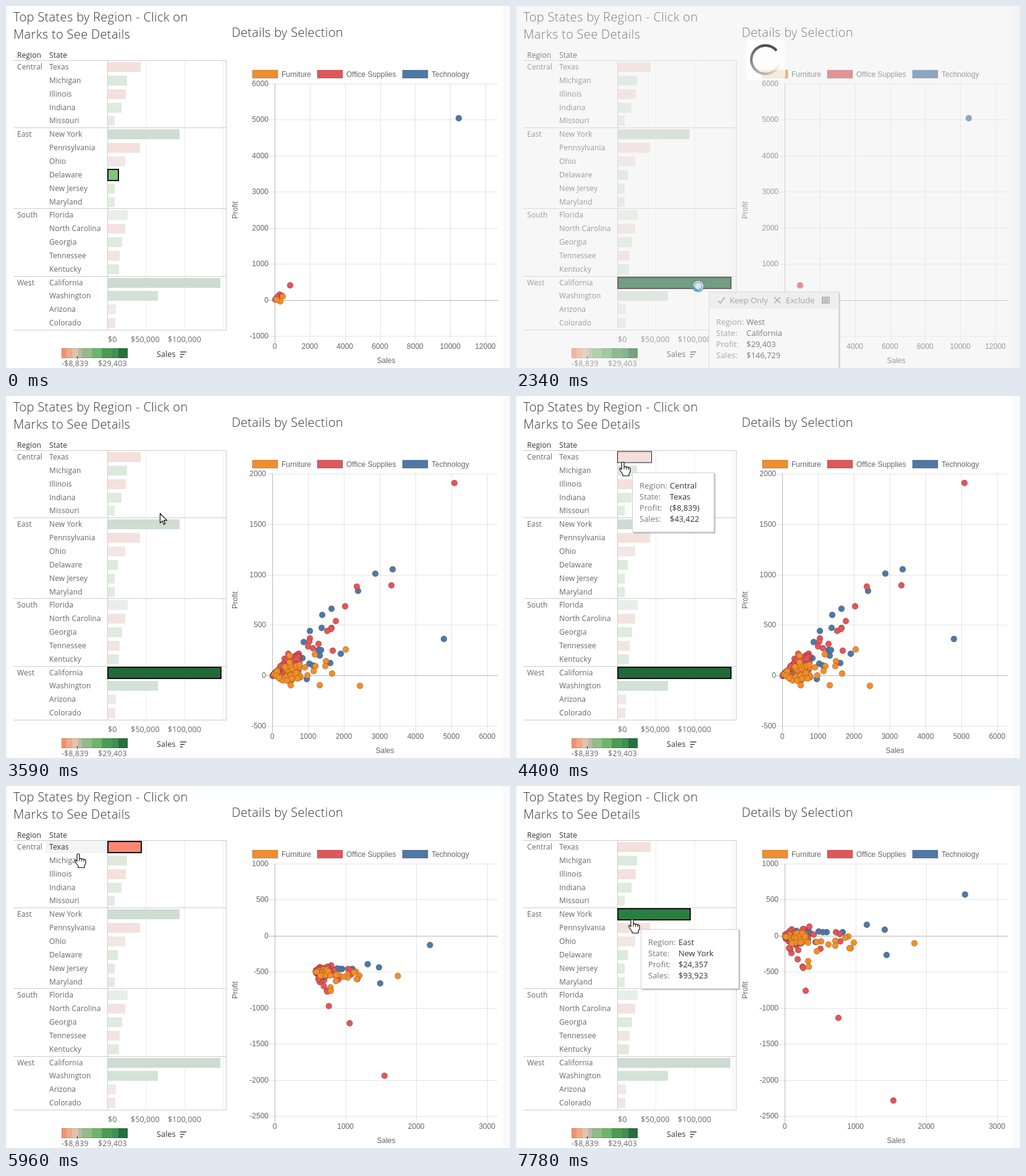
An HTML page for the animation above (8000 ms loop, 816 px wide and 587 px high).

```html
<!DOCTYPE html>
<html lang="en">
<head>
<meta charset="utf-8">
<title>Top States by Region</title>
<style>
html, body { margin: 0; width: 100%; height: 100%; overflow: hidden; background: #fafafa; }
svg { display: block; width: 816px; height: 587px; }
text { font: 12px "Open Sans", "Noto Sans", sans-serif; fill: #666; letter-spacing: .1px; white-space: pre; }
.title { font-size: 20px; font-weight: 300; fill: #333; letter-spacing: .35px; }
.head, .dark { fill: #333; }
.axis { font-size: 12.5px; }
.chart { font: 12px "Liberation Sans", Arial, sans-serif; letter-spacing: 0; }
.tip { font-size: 13px; letter-spacing: 0; fill: #777; }
.tip.dark { fill: #333; }
.line { stroke: #ccc; }
.faint { stroke: #eee; }
.grid { stroke: rgba(0,0,0,.1); }
.zero { stroke: rgba(0,0,0,.28); }
</style>
</head>
<body>
<svg id="stage" viewBox="0 0 816 587" xmlns="http://www.w3.org/2000/svg"></svg>
<script>
const stage = document.getElementById('stage');
const LOOP = 8000;

function add(parent, tag, attrs, content) {
  const el = document.createElementNS('http://www.w3.org/2000/svg', tag);
  set(el, attrs);
  if (content !== undefined) el.textContent = content;
  parent.appendChild(el);
  return el;
}
function set(el, attrs) {
  for (const k in attrs) el.setAttribute(k, attrs[k]);
}
const group = (parent = stage) => add(parent, 'g', {});
const rect = (p, x, y, width, height, fill, more) => add(p, 'rect', { x, y, width, height, fill, ...more });
const line = (p, x1, y1, x2, y2, cls) => add(p, 'line', { x1, y1, x2, y2, class: cls });
const text = (p, x, y, s, cls = '', anchor = 'start') => add(p, 'text', { x, y, class: cls, 'text-anchor': anchor }, s);
const show = (el, on) => el.setAttribute('display', on ? 'inline' : 'none');

function random(seed) {
  return () => {
    seed = (seed + 0x6D2B79F5) | 0;
    let v = Math.imul(seed ^ (seed >>> 15), 1 | seed);
    v = (v + Math.imul(v ^ (v >>> 7), 61 | v)) ^ v;
    return ((v ^ (v >>> 14)) >>> 0) / 4294967296;
  };
}

// ---- bar table ----
const ROW = 21.85, TOP = 88.5;
const states = [
  ['Texas', 53, '#f4dfda'], ['Michigan', 31, '#dde9dd'], ['Illinois', 29, '#f5e0de'],
  ['Indiana', 22, '#dfebdd'], ['Missouri', 11, '#e4ece2'],
  ['New York', 116, '#cedcd2'], ['Pennsylvania', 52, '#f4e1de'], ['Ohio', 28, '#f1e7e4'],
  ['Delaware', 16, '#dcebda'], ['New Jersey', 11, '#e0ecde'], ['Maryland', 11, '#e0ecde'],
  ['Florida', 32, '#eaeeea'], ['North Carolina', 28, '#f3e3e0'], ['Georgia', 23, '#deebdd'],
  ['Tennessee', 19, '#f2e4e1'], ['Kentucky', 18, '#deebdd'],
  ['California', 182, '#cddbd2'], ['Washington', 81, '#d3e2d7'], ['Arizona', 13, '#efe9e8'],
  ['Colorado', 12, '#f2e5e2']
];
const regions = { Central: 0, East: 5, South: 11, West: 16 };
const fullColor = { 0: '#fb8770', 5: '#297f41', 8: '#82c47b', 16: '#22693a' };
const rowMid = i => TOP + 10.5 + i * ROW;

rect(stage, 4, 0, 800, 587, '#fff');
const table = group();
text(table, 12, 25, 'Top States by Region - Click on', 'title');
text(table, 12, 53, 'Marks to See Details', 'title');
text(table, 18, 84, 'Region', 'head');
text(table, 70, 84, 'State', 'head');
const header = rect(table, 64, 89, 100, 20, '#f3f4f3');
for (const x of [226.5, 289.5, 351.5]) line(table, x, 89, x, 525, 'faint');
const labels = states.map(([name, w, color], i) => {
  rect(table, 165, Math.round(rowMid(i) - 8), w, 16, color);
  return text(table, 70, Math.round(rowMid(i) + 4), name);
});
for (const name in regions) {
  const i = regions[name], y = Math.floor(TOP + i * ROW) + .5;
  text(table, 18, Math.round(rowMid(i) + 4), name);
  line(table, 12, y, 357, y, 'line');
}
line(table, 12, 525.5, 357, 525.5, 'line');
line(table, 164.5, 88, 164.5, 526, 'line');
line(table, 356.5, 88, 356.5, 526, 'line');
text(table, 165, 545, '$0', 'axis');
text(table, 202, 545, '$50,000', 'axis');
text(table, 262, 545, '$100,000', 'axis');
text(table, 244, 569, 'Sales', 'axis dark');
add(table, 'path', { d: 'M282 561h10M282 565h7M282 569h4', stroke: '#444', 'stroke-width': 1.6 });
[['#ef9274', 90, 98], ['#f2a983', 98, 107], ['#e2c2ac', 107, 117], ['#b9b9a9', 117, 123], ['#93bb88', 123, 139],
 ['#6fb46b', 139, 155], ['#4a9b55', 155, 172], ['#3f9150', 172, 182], ['#28703f', 182, 197]]
  .forEach(([c, a, b]) => rect(table, a, 555, b - a, 16, c));
rect(table, 90.5, 555.5, 106, 15, 'none', { stroke: 'rgba(0,0,0,.15)' });
rect(table, 115, 568, 1, 4, '#222');
text(table, 90, 584, '-$8,839', 'axis');
text(table, 149, 584, '$29,403', 'axis');
const mark = rect(table, 0, 0, 0, 0, 'none', { stroke: '#111', 'stroke-width': 2 });
const hoverMark = rect(table, 0, 0, 0, 0, 'none', { stroke: '#111' });

// ---- scatter charts ----
const ORANGE = '#f28e2b', RED = '#e15759', BLUE = '#4e79a7';
text(stage, 365.5, 50, 'Details by Selection', 'title');
[[399, 'Furniture', ORANGE], [504, 'Office Supplies', RED], [642, 'Technology', BLUE]].forEach(([x, name, c]) => {
  rect(stage, x, 104, 41, 13, c, { stroke: 'rgba(0,0,0,.12)', 'stroke-width': 2 });
  text(stage, x + 47, 115, name, 'chart');
});
text(stage, 0, 0, 'Profit', 'chart', 'middle').setAttribute('transform', 'translate(375 331) rotate(-90)');

const cloud = (n, seed, place) => {
  const r = random(seed);
  return Array.from({ length: n }, () => place(r)).flat();
};

function makeChart({ left, dx, xMax, xStep, yTop, yStep, rows, center, series }) {
  const g = group();
  for (let i = 0; i * xStep <= xMax; i++) {
    const x = left + i * dx;
    line(g, Math.round(x) + .5, 126, Math.round(x) + .5, 545, i ? 'grid' : 'zero');
    text(g, x, 556, i * xStep, 'chart', 'middle');
  }
  for (let i = 0; i <= rows; i++) {
    const y = 126 + i * 409 / rows, v = yTop - i * yStep;
    line(g, left - 10, Math.round(y) + .5, 796, Math.round(y) + .5, v ? 'grid' : 'zero');
    text(g, left - 10, y + 4, v, 'chart', 'end');
  }
  text(g, (left + 796) / 2, 579, 'Sales', 'chart', 'middle');
  const dots = [];
  for (const [fill, pts] of series)
    for (let i = 0; i < pts.length; i += 2)
      dots.push([add(g, 'circle', { r: 4.9, fill, stroke: 'rgba(0,0,0,.22)' }), pts[i], pts[i + 1]]);
  return {
    g,
    pose(e) {
      for (const [el, x, y] of dots)
        set(el, { cx: center[0] + (x - center[0]) * e, cy: center[1] + (y - center[1]) * e });
    }
  };
}

const delaware = makeChart({
  left: 435, dx: 56.85, xMax: 12000, xStep: 2000, yTop: 6000, yStep: 1000, rows: 7, center: [615, 477],
  series: [
    [BLUE, [733, 182, 440, 473]],
    [RED, [460, 453, 443, 468, 439, 472, 436, 476, 447, 470]],
    [ORANGE, [448, 471, 444, 479, 438, 476]]
  ]
});

const california = makeChart({
  left: 431, dx: 58, xMax: 6000, xStep: 1000, yTop: 2000, yStep: 500, rows: 5, center: [607, 460],
  series: [
    [BLUE, [598, 288, 626, 281, 709, 394, 570, 316, 527, 345, 512, 355, 511, 376, 492, 381, 482, 399, 542, 418,
      506, 412, 510, 412, 508, 421, 480, 425, 525, 433, 487, 459, 491, 434, 497, 437, 432, 454]],
    [RED, [726, 141, 568, 309, 624, 307, 549, 341, 534, 365, 527, 376, 526, 378, 520, 381, 492, 393, 491, 398,
      489, 406, 497, 409, 506, 402, 529, 413, 457, 418, 474, 418, 472, 419, 469, 421, 451, 426]],
    [RED, cloud(60, 4, r => {
      const u = 44 * r() ** 1.3;
      return [432 + u, 453 - Math.min(u * (.2 + r()), 30)];
    })],
    [ORANGE, cloud(62, 9, r => {
      const u = 46 * r() ** 1.1;
      return [432 + u, 451 + (r() - .55) * 26 * Math.min(1, u / 16)];
    })],
    [ORANGE, [550, 411, 500, 419, 518, 430, 517, 438, 501, 438, 498, 446, 528, 450, 508, 469, 573, 470, 461, 469,
      472, 458, 488, 453, 484, 440, 475, 436, 459, 421, 459, 432]]
  ]
});

const texas = makeChart({
  left: 435, dx: 114.6, xMax: 3000, xStep: 1000, yTop: 1000, yStep: 500, rows: 7, center: [616, 400],
  series: [
    [BLUE, [727, 176, 568, 225, 597, 233, 600, 274, 529, 237, 503, 237, 497, 237, 490, 236, 485, 253, 454, 235,
      473, 233, 477, 239]],
    [RED, [475, 228, 466, 232, 518, 237, 524, 240, 482, 241, 493, 264, 525, 252, 446, 271, 444, 264, 442, 263,
      457, 266, 456, 281, 464, 293, 465, 295, 469, 332, 522, 376, 611, 510, 453, 258]],
    [RED, cloud(46, 7, r => {
      const u = 38 * r() ** 1.5;
      return [436 + u, 244 + (r() - .5) * 24 * Math.min(1, .3 + u / 14)];
    })],
    [ORANGE, cloud(34, 3, r => {
      const u = 38 * r();
      return [435 + u, 244 + (r() - .35) * 16 * Math.min(1, u / 12)];
    })],
    [ORANGE, [645, 255, 547, 254, 538, 244, 533, 246, 542, 263, 540, 263, 517, 251, 517, 259, 506, 257, 487, 268,
      494, 252, 487, 253, 473, 284, 474, 293, 473, 254, 447, 255]]
  ]
});
delaware.pose(1);

// ---- tooltips ----
function makeTip(x, y, w, values, commands) {
  const g = group(), h = commands ? 126 : 97, top = commands ? y + 28 : y;
  rect(g, x + 2, y + 2, w, h, 'rgba(0,0,0,.22)');
  rect(g, x + .5, y + .5, w - 1, h - 1, '#fff', { stroke: '#d0d0d0' });
  if (commands) {
    rect(g, x + 1, y + 1, w - 2, 27, '#f0f0f0');
    add(g, 'path', { d: `M${x + 15} ${y + 15}l4 4 7-10M${x + 106} ${y + 9}l10 10m0-10l-10 10`, fill: 'none', stroke: '#777', 'stroke-width': 1.4 });
    add(g, 'path', { d: `M${x + 183} ${y + 9.5}h13m-13 3h13m-13 3h13m-13 3h13`, stroke: '#666', 'stroke-width': 2, 'stroke-dasharray': '3 .7' });
    text(g, x + 34, y + 19, 'Keep Only', 'tip');
    text(g, x + 125, y + 19, 'Exclude', 'tip');
  }
  ['Region:', 'State:', 'Profit:', 'Sales:'].forEach((name, i) => {
    const base = top + 26 + i * 18;
    text(g, x + 12, base, name, 'tip');
    text(g, x + 61, base, values[i], 'tip dark');
  });
  return g;
}
const west = ['West', 'California', '$29,403', '$146,729'];
const tips = {
  west: makeTip(312, 471, 135, west),
  westMenu: makeTip(312, 463, 211, west, true),
  central: makeTip(188, 124, 133, ['Central', 'Texas', '($8,839)', '$43,422']),
  east: makeTip(202, 232, 159, ['East', 'New York', '$24,357', '$93,923'])
};

// ---- loading veil and spinner ----
const veil = rect(stage, 0, 0, 816, 587, '#eaeaea');
const loader = group();
rect(loader, 372, 56, 64, 64, '#fff', { rx: 6, opacity: .72 });
const ring = group(loader);
const polar = a => [23 * Math.cos(a), 23 * Math.sin(a)].map(v => v.toFixed(2)).join(' ');
for (let i = 0; i < 30; i++) {
  const a = -(i + 1) * Math.PI / 18, b = a + Math.PI / 17;
  add(ring, 'path', { d: `M${polar(a)}A23 23 0 0 1 ${polar(b)}`, fill: 'none', stroke: '#4a4d57', 'stroke-width': 4.2, opacity: Math.min(1, 1.25 * (1 - i / 30)) });
}

// ---- cursors ----
const cursors = { arrow: group(), hand: group(), busy: group() };
const outline = { fill: '#fff', stroke: '#111', 'stroke-width': 1.2, 'stroke-linejoin': 'round' };
add(cursors.arrow, 'path', { d: 'M.5 .5V16l3.6-3.4 2.4 5.6 2.4-1-2.4-5.5h5z', ...outline });
add(cursors.hand, 'path', { d: 'M-2 2Q-2 0 0 0Q2 0 2 2V8q2-1.5 3.5.5q2-1 3.5.8q2.5-.7 3 1.7V16L10 19V22.5H0V20L-5 13q-1-3 1-3L-2 12Z', ...outline });
add(cursors.hand, 'path', { d: 'M2 8v4M5.5 8.5v4M9 9.3v3.5', stroke: '#111' });
add(cursors.busy, 'circle', { r: 7.8, fill: 'rgba(255,255,255,.75)', stroke: '#587f95', 'stroke-width': 4 });
add(cursors.busy, 'circle', { r: 7.6, fill: 'none', stroke: '#c9ebf7', 'stroke-width': 2 });
add(cursors.busy, 'path', { d: 'M-7.6 0A7.6 7.6 0 0 0 3 7', fill: 'none', stroke: '#43b4dc', 'stroke-width': 2.2 });

const moves = [
  [0, '', 0, 0], [250, 'arrow', 441, 464], [500, 'arrow', 362, 462], [770, 'hand', 298, 456],
  [1040, 'hand', 297, 455], [1270, 'hand', 295, 454], [1810, 'hand', 295, 454], [2050, 'busy', 295, 454],
  [2340, 'busy', 295, 454], [2600, 'busy', 295, 454], [2850, 'busy', 345, 370], [3100, 'busy', 391, 287],
  [3360, 'arrow', 362, 250], [3590, 'arrow', 249, 190], [3880, 'hand', 180, 145], [4150, 'hand', 173, 107],
  [4400, 'hand', 173, 107], [4660, 'hand', 172, 101], [4930, 'hand', 112, 97], [5170, 'hand', 109, 94],
  [5450, 'hand', 109, 94], [5710, 'hand', 111, 97], [5960, 'hand', 117, 110], [6230, 'hand', 124, 126],
  [6490, 'hand', 129, 137], [6740, 'arrow', 212, 262], [7010, 'hand', 190, 226], [7290, 'hand', 188, 216],
  [7540, 'hand', 188, 216], [7780, 'hand', 188, 216]
];
const picks = [[0, 8], [1040, 16], [4660, 0], [7540, 5]];
const hovers = [[0, -1], [770, 16], [1040, -1], [3880, 2], [4150, 0], [4660, -1], [7010, 6], [7290, 5], [7540, -1]];
const tipTimes = [[0, ''], [770, 'west'], [1810, 'westMenu'], [2850, ''], [4150, 'central'], [4660, ''], [7290, 'east']];
const loads = [[1550, 2600], [4910, 5710]];

const at = (list, t) => list.findLast(e => e[0] <= t);
const clamp = v => Math.max(0, Math.min(1, v));
const easeOut = (t, start) => 1 - (1 - clamp((t - start) / 1124)) ** 4;

function outlineRow(el, i, pad) {
  show(el, i >= 0);
  if (i < 0) return;
  const y = Math.round(rowMid(i));
  set(el, { x: 165 - pad, y: y - 9, width: states[i][1] + 1 + pad * 2, height: 18 });
}

function draw(t) {
  const [, kind, x, y] = at(moves, t);
  for (const k in cursors) show(cursors[k], k === kind);
  if (kind) cursors[kind].setAttribute('transform', `translate(${x} ${y})`);

  const pick = at(picks, t)[1];
  outlineRow(mark, pick, 0);
  mark.setAttribute('width', states[pick][1] + 1);
  mark.setAttribute('fill', fullColor[pick]);
  outlineRow(hoverMark, at(hovers, t)[1], .5);

  const lit = t >= 4930 && t < 6740;
  show(header, lit);
  labels[0].setAttribute('class', lit ? 'dark' : '');

  const tip = at(tipTimes, t)[1];
  for (const k in tips) show(tips[k], k === tip);

  const [first, second] = loads.map(l => l[1]);
  const chart = t > second ? texas : t > first ? california : delaware;
  for (const c of [delaware, california, texas]) show(c.g, c === chart);
  if (chart !== delaware) chart.pose(easeOut(t, chart === texas ? second : first));

  const load = loads.find(([a, b]) => t > a && t <= b);
  const p = load ? clamp((t - load[0]) / 700) : 0;
  veil.setAttribute('opacity', .4 * p);
  loader.setAttribute('opacity', p);
  ring.setAttribute('transform', `translate(404 87) rotate(${-40 + (t - 2340) * .3463})`);
}

let last = -1;
const begin = performance.now();
function tick() {
  const step = at(moves, Math.max(0, performance.now() - begin) % LOOP)[0];
  if (step !== last) draw(last = step);
  requestAnimationFrame(tick);
}
tick();
</script>
</body>
</html>
```
